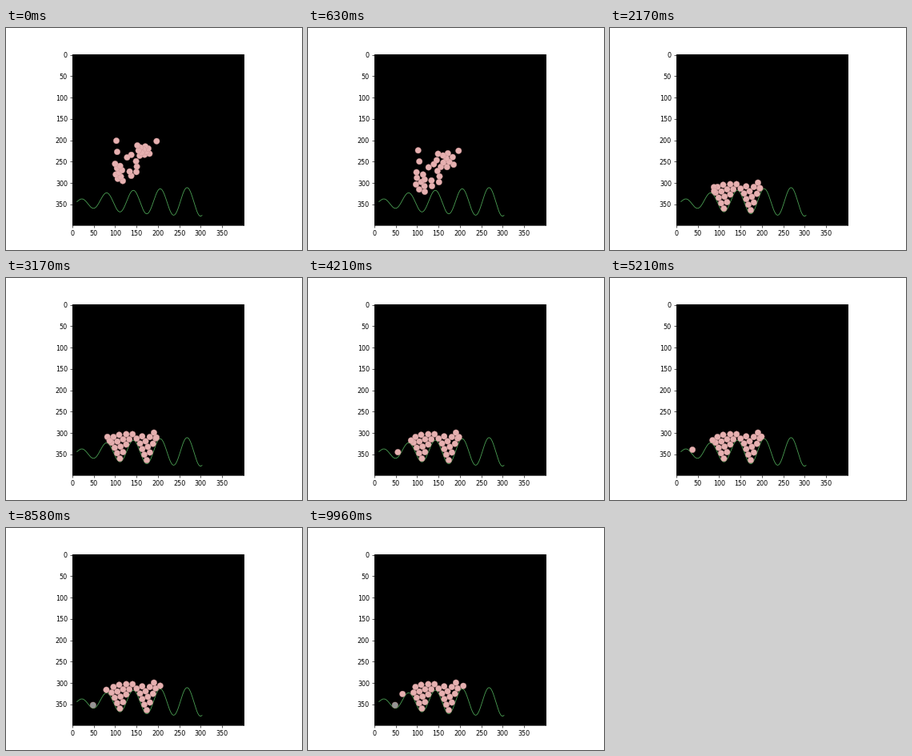
Animation of 370x278 px, one loop 10000 ms. Source, as a matplotlib script:

```python
import math

import matplotlib.pyplot as plt
import numpy as np
from matplotlib.animation import FuncAnimation
from matplotlib.collections import EllipseCollection

DPI = 64
SCALE = 57.8125 / DPI  # default text and tick sizes on the small stage
FRAMES = 250
LAST = 239
R = 7
GRAVITY = 0.2
GOLDEN = (math.sqrt(5) - 1) / 2
PINK, GREY = "#e6b0b0", "#959595"
SLEEP = 190

# Groups of balls in the air: count, left, right, top, bottom
GROUPS = [(2, 103, 106, 201, 227), (9, 100, 119, 255, 295),
          (2, 128, 144, 240, 234), (2, 134, 140, 273, 283),
          (3, 149, 152, 249, 274), (11, 152, 182, 212, 236),
          (1, 197, 197, 202, 202)]

# Balls that leave the pile: step, x, height above the ground
ROLLERS = [
    [(40, 91, 10), (76, 82, 7), (100, 56, 0), (122, 36.5, 0), (150, 48.5, 0)],
    [(40, 89, 0), (200, 81, 0), (225, 75, 0), (239, 66, 0)],
    [(40, 195, 0), (125, 199, 0), (239, 208, 0)],
]


def scatter(n, left, right, top, bottom):
    """Spread n points evenly over a box, row by row."""
    x = left + (right - left) * (np.arange(n) * GOLDEN % 1)
    return np.column_stack([x, np.linspace(top, bottom, n)])


def ground(x):
    n = (x - 1) / 10
    return 343.5 - 10 * np.log(n) * np.sin(n)


def resting_y(x):
    """Height of a ball's centre when it touches the ground at x."""
    d = np.linspace(-R, R, 61)
    reach = np.sqrt(R * R - d * d)
    return (ground(np.asarray(x)[..., None] + d) - reach).min(axis=-1)


def fill_valleys(count, left=82, right=202):
    """Stack balls one by one, each in the lowest hollow that is left."""
    x = np.arange(left, right, 0.25)
    y = resting_y(x)
    slots = []
    for _ in range(count):
        hollow = (y[1:-1] >= y[:-2]) & (y[1:-1] >= y[2:])
        best = 1 + np.argmax(np.where(hollow, y[1:-1], 0))
        bx, by = x[best], y[best]
        slots.append((bx, by))
        dx = np.abs(x - bx)
        above = by - np.sqrt(np.maximum(4 * R * R - dx * dx, 0))
        y = np.where(dx < 2 * R, np.minimum(y, above), y)
    return np.array(slots)


def push_apart(points):
    d = points[:, None] - points
    dist = np.hypot(d[..., 0], d[..., 1]) + np.eye(len(points))
    overlap = np.maximum(2 * R - dist, 0)
    return points + 0.12 * (d * (overlap / dist)[..., None]).sum(axis=1)


def roll(k, path):
    steps, xs, lifts = zip(*path)
    x = np.interp(k, steps, xs)
    return x, resting_y(x) - np.interp(k, steps, lifts)


def goals(k):
    return np.vstack([slots, [roll(k, path) for path in ROLLERS]])


def choose_balls(start, ends):
    """Give each resting place the nearest ball, low ones first."""
    free = list(range(len(start)))
    chosen = []
    for x, _ in ends:
        ball = min(free, key=lambda b: 2 * abs(start[b, 0] - x) - start[b, 1])
        free.remove(ball)
        chosen.append(ball)
    return start[chosen]


start = np.vstack([scatter(*group) for group in GROUPS])
count = len(start)
slots = fill_valleys(count - len(ROLLERS))
spread = [choose_balls(start, goals(0))]
for _ in range(LAST):
    spread.append(push_apart(spread[-1]))


def positions(k):
    home, goal = spread[k], goals(k)
    height = goal[:, 1] - home[:, 1]
    p = np.clip(GRAVITY * k * k / 2 / height, 0, 1)
    x = home[:, 0] + (goal[:, 0] - home[:, 0]) * p ** 2
    y = np.minimum(home[:, 1] + p * height, resting_y(x) + 1)
    return np.column_stack([x, y])


plt.rcParams.update({"font.family": "DejaVu Sans", "font.size": 10 * SCALE})
fig = plt.figure(figsize=(370 / DPI, 278 / DPI), dpi=DPI, facecolor="white")
ax = fig.add_subplot()
ax.imshow(np.zeros((400, 400, 3)))
ax.set_xticks(range(0, 400, 50))
ax.set_yticks(range(0, 400, 50))
ax.tick_params(length=3.5 * SCALE, width=0.8 * SCALE, pad=3.5 * SCALE)
for spine in ax.spines.values():
    spine.set_linewidth(0.8 * SCALE)

wave_x = np.linspace(11, 303, 400)
ax.plot(wave_x, ground(wave_x), color="#4fa858", lw=0.9, scalex=False, scaley=False)

balls = EllipseCollection(
    [2 * R] * count, [2 * R] * count, [0] * count, units="xy",
    offsets=start, offset_transform=ax.transData,
    facecolors=PINK, edgecolors="#c89090", linewidths=0.4, zorder=3)
ax.add_collection(balls, autolim=False)


def update(i):
    k = min(math.ceil(i * 24 / 25), LAST)
    balls.set_offsets(positions(k))
    colors = [PINK] * count
    if k >= SLEEP:
        colors[len(slots)] = GREY  # the first roller has come to rest
    balls.set_facecolor(colors)
    return [balls]


anim = FuncAnimation(fig, update, frames=FRAMES, interval=40,
                     repeat=True, repeat_delay=0, blit=False)
plt.show()
```
